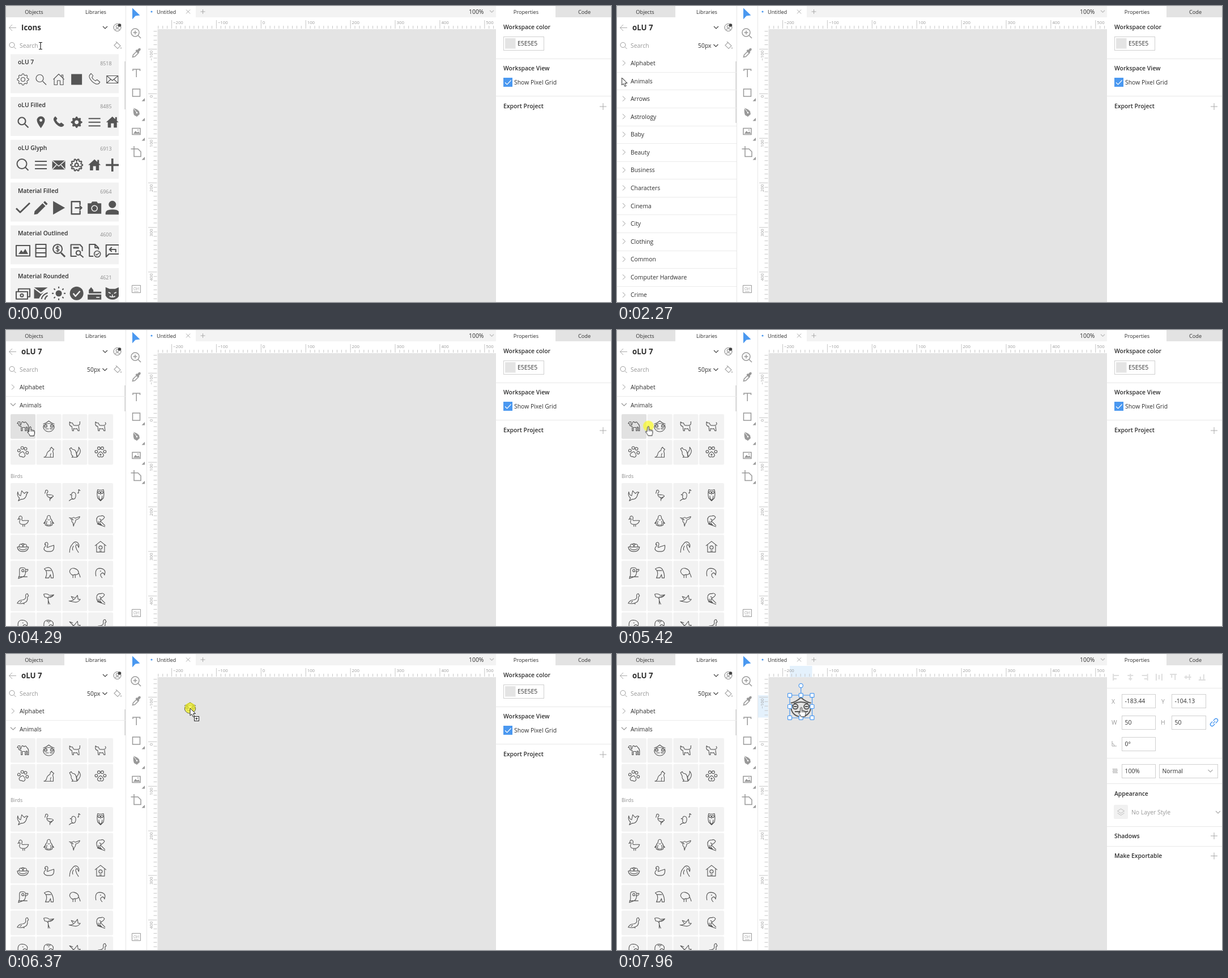
An HTML page that plays this animation: 1068x524 px, repeating every 8000 ms.

```html
<!DOCTYPE html>
<html lang="en">
<head>
<meta charset="utf-8">
<title>Icon library</title>
<style>
html, body { margin: 0; width: 1068px; height: 524px; overflow: hidden; background: #fff; }
svg { display: block; }
text { font: 10.4px "Open Sans", "Noto Sans", sans-serif; fill: #2f2f2f; white-space: pre; }
.b { font-weight: 600; }
.h { font-size: 13.3px; font-weight: 700; }
.tab { font-size: 9.2px; }
.num { font-size: 8.9px; fill: #8c8c8c; }
.rule { font-size: 7.8px; fill: #9a9a9a; }
.key { font-size: 6.2px; fill: #999; }
.g { fill: #999; }
.m { text-anchor: middle; }
.e { text-anchor: end; }
path, circle, rect { fill: none; }
.ic { stroke: #555; stroke-linejoin: round; }
.ic .f { fill: #555; stroke: none; }
.ic .k { stroke: #f2f2f2; stroke-width: 1.6; }
.tool { stroke: #999; stroke-width: 1.5; }
.tool .f { fill: #999; stroke: none; }
.blue { stroke: #4a98f0; }
#cursor { animation: move 8s infinite; }
@keyframes fade { 0%, 90%, 92% { opacity: 1 } 91.3% { opacity: .3 } }
@keyframes move {
  0%, 2.2% { transform: translate(61px, 71px); animation-timing-function: ease-in-out }
  6.25% { transform: translate(55px, 119px); animation-timing-function: step-end }
  14.375%, 23.8% { transform: translate(53px, 120px); animation-timing-function: ease-in-out }
  28.375% { transform: translate(8.5px, 127px); animation-timing-function: step-end }
  33.125% { transform: translate(7.5px, 128px); animation-timing-function: step-end }
  40% { transform: translate(7.5px, 129px); animation-timing-function: step-end }
  45.25%, 47.2% { transform: translate(7.5px, 131px); animation-timing-function: ease-in-out }
  53.625%, 55.3% { transform: translate(43px, 171px); animation-timing-function: ease-in-out }
  58.6% { transform: translate(72px, 194px); animation-timing-function: ease-in-out }
  61.375% { transform: translate(55.5px, 170.5px); animation-timing-function: step-end }
  68.375%, 70.8% { transform: translate(97.5px, 170px); animation-timing-function: ease-in-out }
  79.625% { transform: translate(325px, 96px); animation-timing-function: step-end }
  99%, 100% { transform: translate(325.5px, 94.5px) }
}
</style>
</head>
<body>
<svg id="stage" width="1068" height="524" viewBox="0 0 1068 524"></svg>
<script>
const LOOP = 8000;
const BLUE = '#4a98f0';

const path = (d, attr = '') => `<path d="${d}" ${attr}/>`;
const fill = (d, attr = '') => path(d, 'class="f" ' + attr);
const cut = d => path(d, 'class="k"');
const wide = (d, w) => path(d, `stroke-width="${w}"`);
const dot = (x, y, r, attr = '') => `<circle cx="${x}" cy="${y}" r="${r}" ${attr}/>`;
const box = (x, y, w, h, color, attr = '') =>
  `<rect x="${x}" y="${y}" width="${w}" height="${h}" style="fill:${color}" ${attr}/>`;
const text = (x, y, s, cls = '') => `<text x="${x}" y="${y}" class="${cls}">${s}</text>`;
const line = (d, color, w = 1) => path(d, `stroke="${color}" stroke-width="${w}"`);
const group = (id, body, attr = '') => `<g id="${id}" ${attr}>${body}</g>`;
const each = (n, fn) => Array.from({ length: n }, (_, i) => fn(i)).join('');
const icon = (body, x, y, w = 1.1, s = 1) =>
  `<g class="ic" stroke-width="${w}" transform="translate(${x} ${y}) scale(${s})">${body}</g>`;
const chevron = (x, y, color, r = 4) => line(`M${x - r} ${y - r / 2}l${r} ${r}l${r} ${-r}`, color, 1.2);
const chevronRight = (x, y) => line(`M${x - 2} ${y - 4.5}l4.5 4.5l-4.5 4.5`, '#999');
const plus = (x, y, r, color = '#aaa') => line(`M${x - r} ${y}h${2 * r}M${x} ${y - r}v${2 * r}`, color);

// Icons are drawn around 0,0 and reach about 10 to each side.
function gear(r, teeth) {
  const pts = [];
  for (let i = 0; i < teeth * 4; i++) {
    const a = (i - .5) / teeth / 2 * Math.PI, k = i % 4 < 2 ? r : r * .78;
    pts.push((k * Math.cos(a)).toFixed(1) + ' ' + (k * Math.sin(a)).toFixed(1));
  }
  return 'M' + pts.join('L') + 'Z';
}
const ring = r => `M0 ${-r}a${r} ${r} 0 1 0 .1 0Z`;
const glass = (r, w) => dot(-2, -2, r, `stroke-width="${w}"`) + wide(`M${r * .5} ${r * .5}L9.5 9.5`, w);
const phone = 'M-7-9.5q-3.5 3-1.5 7q3.5 7 10 10q4 2 7-1l1-2l-5-4l-3 2q-4-2-6-6l2-3l-3.5-4z';
const envelope = 'M-10-6.5H10V6.5H-10Z';
const flaps = 'M-10-6.5L0 2L10-6.5M-10 6.5L-3 0M10 6.5L3 0';
const house = fill('M0-10L11 0H8V9.5H2.5V2H-2.5V9.5H-8V0H-11ZM5-9H8V-3L5-5Z');
const menu = w => wide('M-10.5-6.5H10.5M-10.5 0H10.5M-10.5 6.5H10.5', w);

const cards = [
  ['oLU 7', 8518, 1.1, [
    path(gear(10, 8)) + dot(0, 0, 3.5), glass(6.5, 1.2),
    path('M-9.5 0L0-9.5L9.5 0M-8-1V9.5H-2.5V2H2.5V9.5H8V-1M5-5V-8H7.5V-2'),
    box(-9.5, -9.5, 19, 19, '#555', 'stroke="none"'), path(phone), path(envelope + flaps)]],
  ['oLU Filled', 8485, 2, [
    glass(6.5, 2.2), fill('M0 10.5Q-7 1-7-3.5A7 7 0 0 1 7-3.5Q7 1 0 10.5ZM0-6a2.5 2.5 0 1 0 .1 0Z', 'fill-rule="evenodd"'),
    fill(phone), fill(gear(10, 8) + ring(3.5), 'fill-rule="evenodd"'), menu(1.8), house]],
  ['oLU Glyph', 6913, 2, [
    glass(8.5, 2), menu(1.8), fill('M-11.5-8H11.5V8H-11.5Z') + cut('M-11.5-8L0 2L11.5-8M-11.5 8L-4 0M11.5 8L4 0'),
    wide(gear(10.5, 10), 2) + dot(0, 0, 3) + wide('M0-8V-3M-7 4L-3 1M7 4L3 1', 1.5), house, wide('M0-11.5V11.5M-11.5 0H11.5', 3.6)]],
  ['Material Filled', 6964, 2.4, [
    wide('M-12 1L-5 8L12-8.5', 2.8), fill('M-12 12L-11 6L3-8L8-3L-6 11ZM4.5-9.5L7-12L12-7L9.5-4.5Z'), fill('M-10-12L11 0L-10 12Z'),
    path('M6-5V-11H-9V11H6V5M-3 0H9M5-4L9 0L5 4'),
    fill('M-12-8H-6L-4-11H4L6-8H12V10.5H-12Z') + dot(0, 1, 5, 'class="k"') + dot(0, 1, 2.5, 'class="f"'),
    dot(0, -6, 6.5, 'class="f"') + fill('M-12 12V9Q-12 3 0 3T12 9V12Z')]],
  ['Material Outlined', 4600, 2.1, [
    path('M-12-9H12V9.5H-12Z') + fill('M-8 6L-3-1L0 3L4-3L9 6Z'), path('M-9-11H9V11H-9ZM-9-4H9M-9 4H9'),
    dot(-2, -3, 8) + wide('M4 4L11 11', 3) + wide('M1-6Q-2-8-4-6T-2-3T0 0T-5 0M-2-9V3', 1.5),
    path('M10 1V-6L6-10.5H-10V10H0M6 7L12 12') + wide('M-6-5H4', 3) + dot(3, 4, 3.8),
    path('M-2 10H-9V-11H1L7-5V-2M1-11V-5H7') + dot(5, 6, 5.5, 'stroke-width="1.6"') + wide('M2 6L4 8L8 4', 1.5),
    path('M-11 11V-10H12V6H-6ZM-5-2H6V3M-1-6L-5-2L-1 2')]],
  ['Material Rounded', 4621, 2.1, [
    path('M-12-3H8V10H-12ZM-8-3V-8H12V6H8') + dot(-2, 3.5, 2.5),
    fill('M-12-10.5H12L0-2ZM-12-8L0 1L5-2Q-2 5-3 9H-12Z') + path('M1 10Q3 2 12-1M7 11Q8 6 12 4'),
    dot(0, 0, 5.5, 'class="f"') + each(8, i => path('M0-9V-12', `transform="rotate(${i * 45})"`)),
    dot(0, 0, 12, 'class="f"') + path('M-6 0L-2 5L6-4', 'class="k" style="stroke-width:2.4"'),
    fill('M-12 2H12V11H-12ZM-10 0V-6L-6-11L-2-6V-3H12V0Z') + cut('M3 7H9'),
    fill('M-12-11L-5-8H5L12-11V4Q8 11 0 11T-12 4Z') + cut('M-7-2L-3 0M7-2L3 0M-5 5Q0 8 5 5M0 2V6')]]
];

const frog = path('M-10-4Q-5-5 0-9.5Q5-5 10-4M-7-3.5Q0-6.5 7-3.5M-8.5-2.5Q-11 1-8 5.5Q-5 9.5 0 9.5T8 5.5Q11 1 8.5-2.5M-6 4.5H0M2 3.5Q4 5.5 7 4') +
  dot(-5.5, -.5, 2.5) + dot(5.5, -.5, 2.5) + path('M-7-.5H-4M4-.5H7');
const cat = 'M-9-8l2 2h3l2 4q5 1 9 0q3-1 2-6l1 0M-9-8v5q1 3 4 3l1 8h2v-4q4 1 6 0l2 4h2l-1-9';
const paw = dot(-7.5, -1, 2.3) + dot(-3, -7, 2.4) + dot(3, -7, 2.4) + dot(7.5, -1, 2.3) +
  path('M0-1q4 2 5.5 6q-1 5-5.5 3q-4.5 2-5.5-3q1.5-4 5.5-6');
const parrot = 'M2-9q-9-1-9 7q0 8 9 9q-6-5-1-8q5-3 6-6q-3-4-6-2M-6 5l14 5M0 0l8 8M-2-4l3 2M-4 0q0 5 4 6';
const head = 'M-8 6q-3-14 7-14q9 1 9 7l-1 5q-1-4-4-4q-6 3 0 9M-1-3h2';
const peacock = 'M8-9q-4 0-3 6q0 4-5 5q-7 0-10 6q8 2 13-1q6-2 5-10l2-2zM2 7v3M-5 7l3-3';
const flying = 'M-10 4q8 0 11-5l4-5l1 7l4 0q-4 6-10 5zM-2 2l-4-6l6 2';
const animals = [
  path('M-10-5l2-3h3v5q1 2 2-1q1-5 3-4q2 2 3 1q2-2 4 2q3 2 3 6v7h-2v-6l-2-1v7h-2v-6h-5v6h-2v-8q-5 0-5-5z'),
  frog, path(cat), path(cat.replace('q3-1 2-6l1 0', 'q4-2 1-5')), `<g transform="rotate(15)">${paw}</g>`,
  path('M-9 9q4-1 5-4q1-6 6-8l1-4l2-2l1 2l3 2l-2 3l1 4v7h-8M-9 9h12M4 2q-2 3-1 7'),
  path('M-9-6l3-2l2 3q6 0 7 7l1 7h-9l2-2q-4-3-3-7zM5 8q-3-6 0-9q3-4 2-8q5 6 2 11q-2 4-4 6'),
  paw + path('M0 2.5v4M-2 4.5h4')
];
const birds = [
  path('M-9-6q1 6 5 7l2-9q3 4 5 5q2-4 6-2q-3 2-3 6q-3 7-9 6l-5 3l2-5q-5-4-3-11z'),
  path('M-6-6q0-4 3-3q3 2 0 5q-2 4 3 3q8 0 8 3q-5 4-9 1q-3-2-2-5M2 4v6M2 7l4-3M-6-6l-1 3'),
  path('M-5-2q0-4 4-3q3 1 3 5q0 6-4 7h-4l-4 3M-5-2l-3 1l3 1q-2 7 4 7M7-4v-6l3 2') + dot(6, -4, 1, 'class="f"'),
  path('M-5-10q5 2 10 0q2 7 0 15l-5 5l-5-5q-2-8 0-15zM0-3v2M-3 1q0 5 3 8q3-3 3-8') + dot(-2.5, -5, 2) + dot(2.5, -5, 2),
  path('M-7-5q0-4 3-4q4 1 2 6q0 3 4 2l8 0q-2 7-9 7q-8 0-7-6q2-2 1-4l-4 1zM0 6v4M3 6v4'),
  path('M-3-5q0-5 3-5t3 5q5 5 3 12q-6 4-12 0q-2-7 3-12zM-5-1l-4 5h3M5-1l4 5h-3M-2-3q2 2 4 0M-3 0q-2 5 0 7h6q2-2 0-7'),
  path('M-10-6l6 1q2-3 5 0l8-3q0 4-7 6q0 4-3 7l-1 4l-1-6q-3-2-2-6M-2-2q-4-2-6-2'),
  path(parrot),
  path('M-10 0h20q-1 8-10 8t-10-8M-7 3q7 4 14 0M-7 0q1-6 4-5q3 1 3 5q1-6 4-5q3 1 3 5M-3-4q3-4 6 0'),
  path('M-7-4q0-5 4-4q3 2 0 7q-1 3 3 1l9-3q1 11-6 11h-6q-7-2-5-7q4-4 2-6z'),
  path('M-9 10q0-10 5-15q4-6 9-3q4 4 2 9l-2-5q-4 0-3 4q1 5 5 10M-2-2q-3 5-1 8M1-6h1'),
  path('M-10-2L0-10L10-2M-7-4V9H7V-4M-2 7h4') + dot(0, 1, 3),
  path('M-2-9q7-1 7 5q0 9-5 11l-8 3l2-6q0-5 0-9q0-4 4-4M5-6h4q0 5-6 4M-8 7h16') + dot(0, -4, 2),
  path('M-8-7q8-5 12 0q5 8 4 16h-4l-1-6l-3 6h-6q4-7 1-13zM-5-4h9'),
  path('M-9-2q1-7 8-6q8 2 8 8q-2 4-7 3q-6 3-9-5M7 0q2 4 3 8M-3 4v5M1 4v5'),
  path(head), path(peacock),
  path('M-9-8q6-2 10 2l8-1q-4 6-10 4q-1 7 3 13M-9-8l2 5q5 0 6 4v9M1-3l7-3'),
  path(flying), path(parrot), path(head), path(head + 'M-4-6q4 1 7 0'),
  path(flying.replace('l-4-6', 'l-7-7')), path(peacock)
];

const left = () => {
  const tileX = i => 8 + i % 4 * 45.7, rowY = i => Math.floor(i / 4) * 45.8;
  const tile = (x, y, color = '#f2f2f2', attr = '') => box(x, y, 44, 43.6, color, 'rx="2" ' + attr);
  const bar = h => box(209, 98, 2, h, '#dcdcdc');
  const rows = ['Alphabet', 'Animals', 'Arrows', 'Astrology', 'Baby', 'Beauty', 'Business', 'Characters',
    'Cinema', 'City', 'Clothing', 'Common', 'Computer Hardware', 'Crime'];

  const overview = text(27, 43, 'Icons', 'h') + bar(85) + cards.map(([name, count, w, set], i) => {
    const y = 85.3 + i * 75.75;
    return box(8, y, 191, 69, '#f2f2f2') + (i ? '' : box(8, y, 191, 69, '#e1e1e1', 'id="cardHover"')) +
      text(21, y + 18, name, 'b') + text(186.5, y + 19.5, count, 'num e') +
      '<g clip-path="url(#cardClip)">' + set.map((s, k) => icon(s, 30 + k * 31.55, y + 44.7, w)).join('') + '</g>';
  }).join('');

  const list = bar(109) + rows.map((name, i) => {
    const y = 101 + i * 31.57;
    return chevronRight(12, y) + text(24, y + 4, name) + line(`M0 ${Math.round(y + 15.8) + .5}H211`, '#ebebeb');
  }).join('');

  const open = bar(46) + chevronRight(12, 101) + text(24, 105, 'Alphabet') + line('M0 117.5H211', '#ebebeb') +
    chevron(12.5, 132, '#999', 4.5) + text(24, 136.5, 'Animals') + text(8, 262, 'Birds', 'num') +
    each(8, i => tile(tileX(i), 149 + rowY(i))) + each(24, i => tile(tileX(i), 271 + rowY(i))) +
    tile(8, 149, '#e1e1e1', 'id="hover1"') + tile(53.7, 149, '#e1e1e1', 'id="hover2"') +
    group('glyphs', animals.map((s, i) => icon(s, tileX(i) + 21.8, 170.5 + rowY(i))).join('') +
      birds.map((s, i) => icon(s, tileX(i) + 21.8, 292.5 + rowY(i))).join(''));

  return box(0, 0, 103, 20, '#e3e3e3') + text(49.5, 13.5, 'Objects', 'tab m') + text(158.5, 13.5, 'Libraries', 'tab m') +
    line('M18 38.5H5.5M11 33L5.5 38.5L11 44', '#aaa') + chevron(175, 38, '#444') +
    dot(196.5, 38, 6.5, 'stroke="#777"') + dot(196.5, 36.5, 2.3, 'stroke="#777"') + path('M192 42.5q4.5-5 9 0', 'stroke="#777"') +
    dot(200.5, 34, 2.8, 'style="fill:#444"') +
    dot(10.5, 69, 4.5, 'stroke="#999"') + line('M14 72.5L17.5 76', '#999') + text(24, 74, 'Search', 'g') +
    line('M191 69.5l5-5l6 6l-5 5zM194 63l3 3M203 73v3', '#aaa', 1.2) +
    group('overview', overview) +
    group('library', text(27, 43, 'oLU 7', 'h') + text(143, 74, '50px') + chevron(174.5, 70, '#444')) +
    group('list', list) + group('open', open) + line('M211.5 0V524', '#e6e6e6');
};

const toolbar = () => '<g class="tool">' +
  path('M223 3.5V23.5L228.5 17.5L236.5 16.5Z', `style="fill:${BLUE};stroke:none"`) +
  dot(228, 47, 7) + path('M224.5 47h7M228 43.5v7M233 52l5 5') +
  path('M223.5 90.5l1-4l6-6l3 3l-6 6z') + fill('M228.5 79l2-2l1 1l3-3q4-1 3 3l-3 3l1 1l-2 2z') +
  path('M224 115v-3h12.5v3M230.2 112v14') + path('M223.5 147h13v13h-13z') +
  fill('M225 180.5q7 2 10 6l1 5l-5 4.5l-5-3q-2-5-1-12.5z') + path('M225 181l5.5 7', 'style="stroke:#fff;stroke-width:1"') +
  dot(231, 189, 1.3, 'style="fill:#fff;stroke:none"') +
  path('M223 216.5h14v11h-14z') + fill('M225 226l3.5-5l3 3l2-2l3 4z') + dot(233, 219.5, 1, 'class="f"') +
  path('M226 248v5M220.5 253h5.5M226 253h7l5 5v8.5h-12z') +
  [166, 201, 236, 270].map(y => fill(`M245 ${y - 3}v5.5h-5.5z`)).join('') +
  path('M222.5 494.5h15v13h-15z', 'style="stroke-width:1"') + '</g>' + text(230, 503, 'Ctrl', 'key m') +
  line('M226 505.5h8', '#bbb') + line('M248.5 0V524', '#e6e6e6');

const workspace = () => {
  const unit = .789, x0 = 450.3, y0 = 155.3;
  const pos = (zero, i) => (zero + i * 10 * unit).toFixed(1);
  const label = i => String(i * 10).replace('-', '\u2212');
  let ticks = '', labels = '';
  for (let i = -23; i <= 52; i++) {
    const x = pos(x0, i), big = i % 10 === 0;
    ticks += `M${x} ${big ? 25 : 35}V40`;
    if (big) labels += text(+x + 2.5, 32, label(i), 'rule');
  }
  for (let i = -14; i <= 46; i++) {
    const y = pos(y0, i), big = i % 10 === 0;
    ticks += `M${big ? 251 : 260.5} ${y}H266.5`;
    if (big) labels += `<text class="rule e" transform="translate(258.5 ${+y + 2.5}) rotate(-90)">${label(i)}</text>`;
  }
  return box(335, 0, 530, 20, '#f3f3f3') + dot(257, 10, 1.6, `style="fill:${BLUE}"`) + text(266, 13.5, 'Untitled', 'tab') +
    line('M318 6.5l7 7m0-7l-7 7', '#aaa') + plus(347.5, 10, 4) + text(817, 14, '100%') + chevron(857.5, 9.5, '#bbb', 3.5) +
    group('mark', box(305, 21, 39.5, 20, '#e4f1fc') + box(249, 73, 18, 39.5, '#e4f1fc')) +
    line(ticks, '#c6c6c6') + labels + box(267.5, 41, 597.5, 483, '#e4e4e4');
};

const selection = () => icon(frog, 324.7, 94, 1.1, 1.8) + '<g class="blue" stroke-width="1.2">' +
  path('M305 73H344.5V113H305ZM324.7 60V73') + dot(324.7, 56, 3.6, 'style="fill:#fff"') +
  each(9, i => i === 4 ? '' : box(301.5 + i % 3 * 19.7, 69.7 + Math.floor(i / 3) * 19.8, 7, 7, '#fff', 'rx="1"')) + '</g>';

const right = () => {
  const rule = y => line(`M865 ${y}.5H1068`, '#e8e8e8');
  const field = (x, y, w, s) => box(x + .5, y + .5, w, 24, '#fff', 'stroke="#d0d0d0"') + text(x + 5.5, y + 16.3, s);
  const bars = ['M-5-6V6M-4-3H5M-4 3H1', 'M0-6V6M-5-3H5M-3 3H3', 'M5-6V6M-5-3H4M-1 3H4'];
  const aligns = each(7, i => `<g transform="translate(${881 + i * 25.3} 41)${i > 3 ? ' rotate(90)' : ''}">` +
    line(i === 3 ? 'M-5-6V6M5-6V6M0-4V4' : bars[i % 4], '#dedede', 2) + '</g>');
  return box(865, 0, 203, 524, '#fff') + box(970, 0, 98, 20, '#e3e3e3') +
    text(918, 13.5, 'Properties', 'tab m') + text(1021, 13.5, 'Code', 'tab m') +
    group('project', text(878, 40.5, 'Workspace color', 'b') + box(878.5, 54.5, 71, 24, '#fff', 'stroke="#d0d0d0"') +
      box(881, 57, 18.5, 18.5, '#e4e4e4') + text(903, 70.3, 'E5E5E5') + rule(93) +
      text(878, 114, 'Workspace View', 'b') + box(878, 127, 16, 16, BLUE) + line('M881 135.5l3.5 3.5l7-7.5', '#fff', 1.2) +
      text(897, 139, 'Show Pixel Grid') + rule(159) + text(878, 181, 'Export Project', 'b') + plus(1054, 178, 6)) +
    group('object', aligns + rule(60) + text(873, 88, 'X', 'g') + field(891, 71, 59, '-183.44') + text(961, 88, 'Y', 'g') +
      field(979, 71, 60, '-104.13') + text(873, 125, 'W', 'g') + field(891, 109, 59, '50') + text(960, 125, 'H', 'g') +
      field(979, 109, 60, '50') +
      '<g class="blue" stroke-width="1.4" transform="translate(1054 121) rotate(-45)">' +
      path('M-1-3H-5a3 3 0 0 0 0 6H-1M1-3H5a3 3 0 0 1 0 6H1M-3 0H3') + '</g>' +
      line('M874 154v9h8M874 158q4 1 4 5', '#aaa') + field(891, 147, 59, '0°') + rule(184) +
      each(16, i => box(875 + i % 4 * 2.2 + (i >> 2) % 2 * .6, 203 + (i >> 2) * 2.2, 1.3, 1.3, '#888')) +
      field(891, 195, 59, '100%') + field(957, 195, 103, 'Normal') + chevron(1047.5, 207, '#aaa') + rule(229) +
      text(878, 251, 'Appearance', 'b') + box(877, 267, 25, 25, '#f1f1f1', 'rx="2"') +
      line('M883.5 278l6-4l6 4l-6 4zM883.5 281.5l6 4l6-4', '#bbb') + text(908, 284, 'No Layer Style', 'g') +
      chevron(1061, 280, '#aaa') + rule(305) + text(878, 326, 'Shadows', 'b') + plus(1054, 322, 6) + rule(340) +
      text(878, 361, 'Make Exportable', 'b') + plus(1054, 357.5, 6));
};

const pointer = () => {
  const ink = 'stroke="#222" stroke-linejoin="round" style="fill:#fff"';
  return group('dragged', icon(frog, 0, -.5)) +
    group('press', dot(0, -.5, 9.5, 'style="fill:#fafa14;fill-opacity:.66"')) +
    group('beam', line('M-3-6.5h2.5l.5 1l.5-1H3M0-5.5V5M-3 5.5h6', '#222', 1.2)) +
    group('arrow', path('M0 0V13L3 10.5L5.5 15.5L7.5 14.5L5.5 9.5H9.5Z', ink)) +
    group('hand', path('M-1.5 1q1.5-2 2.5 0V6q1.5-1 2.2.4q1.6-.8 2.2.5q2-.4 2 1.6v4q-1 2-1 4h-7q-1-3-4.5-6.5q0-2 2.6-.5z', ink) +
      line('M1 6v3M3.3 6.5V9M5.5 7V9', '#222', .8)) +
    group('badge', box(7.5, 14.5, 8, 8, '#fff', 'stroke="#222"') + plus(11.5, 18.5, 2.2, '#222'));
};

document.getElementById('stage').innerHTML =
  '<defs><clipPath id="cardClip"><rect x="8" y="85" width="191" height="439"/></clipPath></defs>' +
  left() + toolbar() + workspace() + group('selection', selection()) + right() + group('cursor', pointer());

// Each part is visible only inside its [from, to] spans, in ms.
const spans = {
  overview: [[0, 1370]], cardHover: [[320, 1370]], library: [[1370, LOOP]], list: [[1370, 3620]],
  open: [[3620, LOOP]], glyphs: [[3670, LOOP]], hover1: [[4040, 4540], [4790, 5470]], hover2: [[4540, 4790]],
  beam: [[0, 260]], arrow: [[260, 4040], [5710, 7960]], hand: [[4040, 5470], [7960, LOOP]], badge: [[5710, 7720]],
  press: [[820, 950], [2870, 2970], [5420, 7310]], dragged: [[5470, 7310]],
  project: [[0, 7920]], object: [[7920, LOOP]], selection: [[7920, LOOP]], mark: [[7920, LOOP]]
};
const at = (ms, state) => `${ms / LOOP * 100}%{visibility:${state}}`;
let css = '';
for (const [id, list] of Object.entries(spans)) {
  const keys = (list[0][0] ? at(0, 'hidden') : '') + list.map(([from, to]) =>
    at(from, 'visible') + (to < LOOP ? at(to, 'hidden') : at(LOOP, 'visible'))).join('');
  const last = list[list.length - 1][1] < LOOP ? at(LOOP, 'hidden') : '';
  css += `@keyframes show-${id}{${keys}${last}}`;
  css += `#${id}{animation:show-${id} ${LOOP}ms step-end infinite${id === 'press' ? `,fade ${LOOP}ms linear infinite` : ''}}`;
}
document.head.append(Object.assign(document.createElement('style'), { textContent: css }));
</script>
</body>
</html>
```
